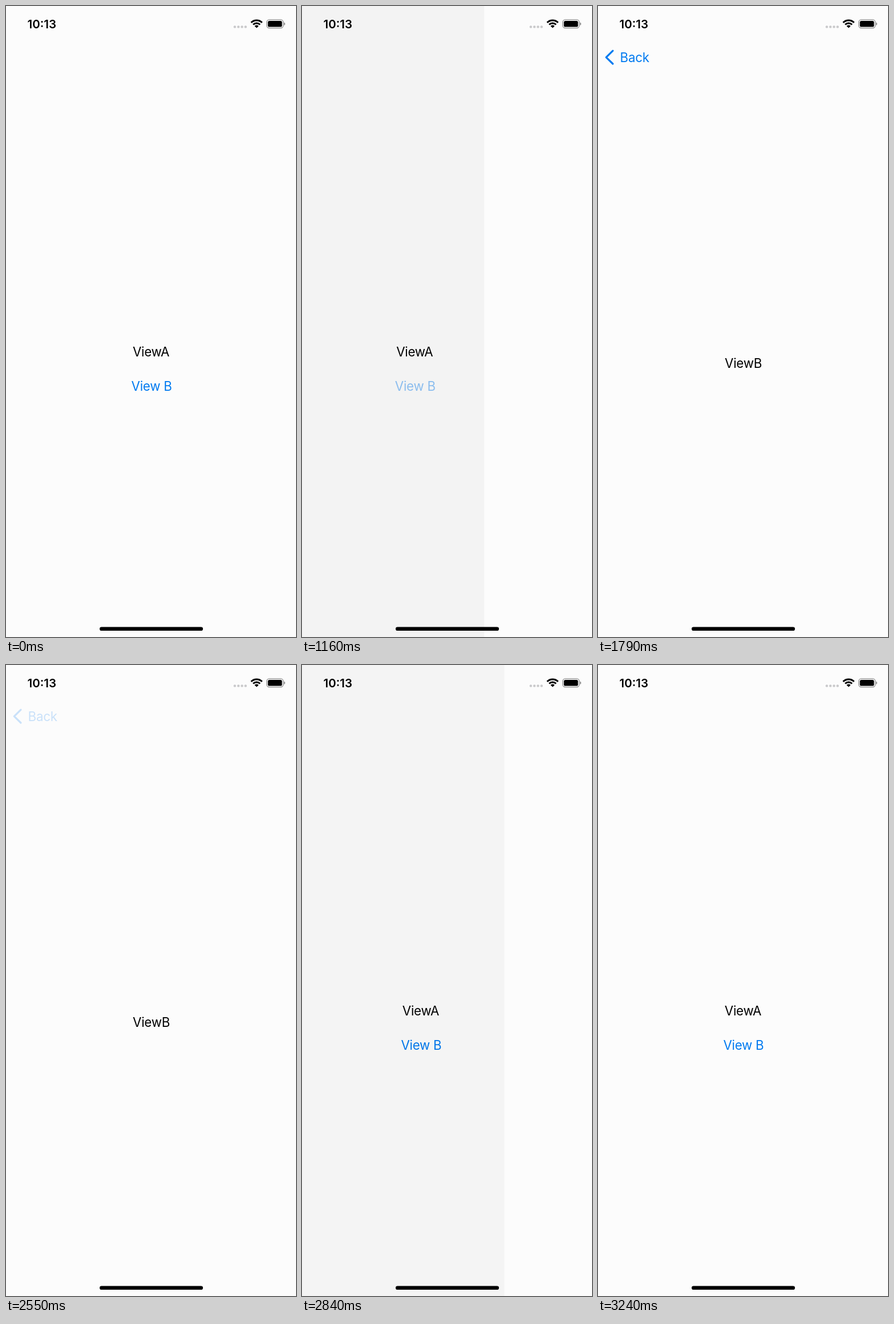
Animation, 508 px wide and 1102 px high, one loop 3270 ms. Source, as an HTML page with a canvas:

```html
<!DOCTYPE html>
<html lang="en">
<head>
<meta charset="utf-8">
<title>Navigation push and pop</title>
<style>
  html, body { margin: 0; width: 100%; height: 100%; overflow: hidden; background: #fcfcfc; }
  canvas { display: block; width: 508px; height: 1102px; }
</style>
</head>
<body>
<canvas id="stage" width="508" height="1102"></canvas>
<script>
const W = 508, H = 1102, LOOP = 3270;
const PAPER = '#fcfcfc', BLUE = '#007af0', INK = '#000';
const FACE = 'Inter, "Liberation Sans", sans-serif';
const BODY = `400 22.3px ${FACE}`, CLOCK = `600 20.5px ${FACE}`;

// Touch and transition times in ms
const PRESS_LINK = 960, PUSH = 1090, PRESS_BACK = 2550, RELEASE_BACK = 2680, POP = 2708;

const ctx = document.getElementById('stage').getContext('2d');
const clamp = v => Math.min(1, Math.max(0, v));
const ramp = (t, from, to) => clamp((t - from) / (to - from));

// Critically damped spring: stiffness 1000, mass 3
const OMEGA = Math.sqrt(1000 / 3);
function spring(ms) {
  const x = OMEGA * Math.max(0, ms) / 1000;
  return 1 - (1 + x) * Math.exp(-x);
}

// Opacity of a button that dims while pressed
function pressAlpha(t, down, up) {
  if (t < down) return 1;
  return 0.2 + 0.8 * ramp(t, up, up + 250);
}

function text(str, x, y, color, font = BODY, align = 'center', spacing = '-0.25px') {
  ctx.font = font;
  ctx.letterSpacing = spacing;
  ctx.textAlign = align;
  ctx.fillStyle = color;
  ctx.fillText(str, x, y);
}

function pill(x, y, w, h, r, color) {
  ctx.fillStyle = color;
  ctx.beginPath();
  ctx.roundRect(x, y, w, h, r);
  ctx.fill();
}

function drawRoot(shown, linkAlpha) {
  ctx.save();
  ctx.translate(-0.3 * W * shown, 0);
  text('ViewA', 254, 612, INK);
  ctx.globalAlpha = linkAlpha;
  text('View B', 255, 672, BLUE);
  ctx.restore();
  ctx.fillStyle = `rgba(0,0,0,${0.1 * shown})`;
  ctx.fillRect(0, 0, W, H);
}

function drawDetail(shown) {
  ctx.save();
  ctx.translate(W * (1 - shown), 0);
  ctx.fillStyle = PAPER;
  ctx.fillRect(0, 0, W, H);
  text('ViewB', 254.5, 631.5, INK);
  ctx.restore();
}

function drawBack(shown, alpha, chevronAlpha) {
  const rest = 1 - shown, scale = 1 + 1.2 * rest;
  ctx.save();
  ctx.globalAlpha = alpha * clamp(1 - 2.2 * rest);
  ctx.translate(38.6 - 50 * rest, 98 + 79 * rest);
  ctx.scale(scale, scale);
  text('Back', 0, 0, BLUE, BODY, 'left');
  ctx.restore();

  ctx.save();
  ctx.globalAlpha = alpha * chevronAlpha;
  ctx.strokeStyle = BLUE;
  ctx.lineWidth = 3.2;
  ctx.lineCap = ctx.lineJoin = 'round';
  ctx.beginPath();
  ctx.moveTo(26, 78.2);
  ctx.lineTo(14.3, 89.6);
  ctx.lineTo(26, 101);
  ctx.stroke();
  ctx.restore();
}

function drawWifi(x, y) {
  const from = -Math.PI * 0.75, to = -Math.PI * 0.25;
  ctx.strokeStyle = ctx.fillStyle = INK;
  ctx.lineWidth = 3;
  for (const r of [13.5, 8.5]) {
    ctx.beginPath();
    ctx.arc(x, y, r, from, to);
    ctx.stroke();
  }
  ctx.beginPath();
  ctx.moveTo(x, y);
  ctx.arc(x, y, 5, from, to);
  ctx.fill();
}

function drawSystem() {
  text('10:13', 37.5, 38.5, INK, CLOCK, 'left', '0px');
  for (let i = 0; i < 4; i++) pill(398.6 + 6.3 * i, 34.2, 4.4, 4.4, 2.2, '#c9c9cb');
  drawWifi(439, 38.5);

  ctx.strokeStyle = '#8e8e8e';
  ctx.lineWidth = 1.3;
  ctx.beginPath();
  ctx.roundRect(456.7, 23.8, 29, 14.8, 4.5);
  ctx.stroke();
  pill(458.7, 25.9, 24.8, 10.6, 2.6, INK);
  pill(487, 28.7, 1.9, 5, [0, 1.9, 1.9, 0], '#8e8e8e');

  pill(164, 1084.4, 181, 6.7, 3.35, INK);
}

function draw(t) {
  const pushed = spring(t - PUSH), popped = spring(t - POP);
  const shown = t < POP ? pushed : 1 - popped;

  ctx.fillStyle = PAPER;
  ctx.fillRect(0, 0, W, H);
  drawRoot(shown, pressAlpha(t, PRESS_LINK, PUSH));
  drawDetail(shown);
  const chevron = t < POP ? ramp(t, 1270, 1520) : clamp(1 - 2.2 * popped);
  drawBack(shown, pressAlpha(t, PRESS_BACK, RELEASE_BACK), chevron);
  drawSystem();
}

function tick() {
  draw(performance.now() % LOOP);
  requestAnimationFrame(tick);
}
tick();
</script>
</body>
</html>
```
